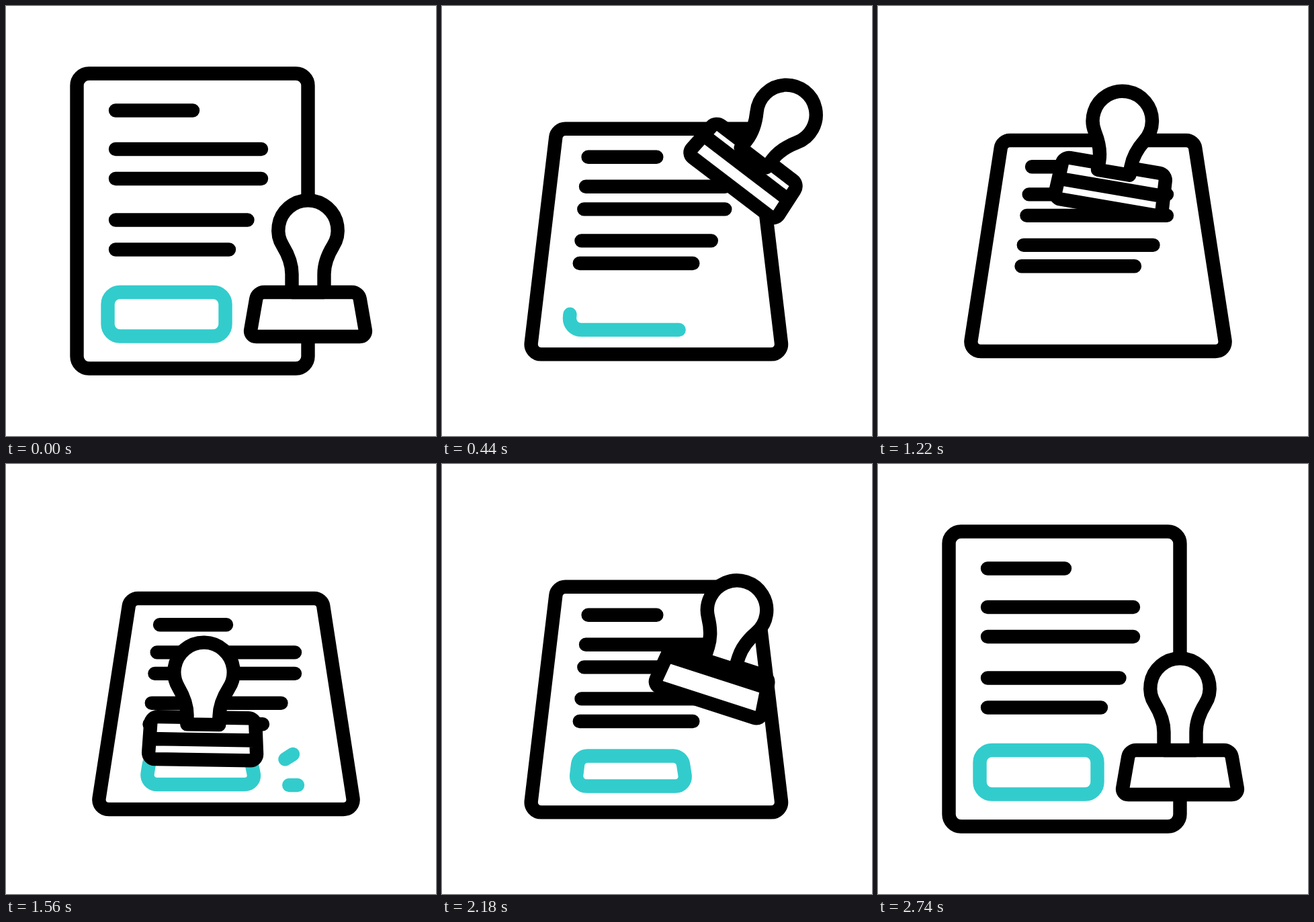
Recreate the animation shown at these times as an HTML page. Size 640x640 px, loop 3.6 s.

```html
<!DOCTYPE html>
<html lang="en">
<head>
<meta charset="utf-8">
<title>Stamping a document</title>
<style>
  html, body { margin: 0; width: 100%; height: 100%; overflow: hidden; background: #fff; }
  svg { display: block; width: 100%; height: 100%; }
  path { fill: none; stroke: #000; stroke-width: 20.4; stroke-linecap: round; stroke-linejoin: round; }
  .teal { stroke: #33cccc; }
  #stamp path { fill: #fff; }
</style>
</head>
<body>
<svg viewBox="0 0 640 640">
  <path id="paper"/>
  <path id="lines"/>
  <path id="mark" class="teal" pathLength="1"/>
  <path id="splash" class="teal"/>
  <g id="stamp">
    <path id="base"/>
    <path id="handle"/>
  </g>
</svg>
<script>
const LOOP = 3600, LAND = 1360, HOME = 2740;
const el = id => document.getElementById(id);
const draw = (id, d) => el(id).setAttribute('d', d);

const mix = (a, b, k) => a + (b - a) * k;
const mixAll = (a, b, k) => a.map((v, i) => mix(v, b[i], k));
const ease = (t, from, to) => {
  const s = Math.min(1, Math.max(0, (t - from) / (to - from)));
  return s * s * (3 - 2 * s);
};

// A sheet is a trapezoid: y, left, right of the top and of the bottom, then both radii
const rect = (left, top, right, bottom) => [top, left, right, bottom, left, right, 18, 18];
const paperFlat = rect(105.5, 100.5, 449.5, 539.5);
const paperTilt = [200, 184.5, 470.5, 514, 136, 519, 11.5, 17];
const markFlat = rect(151.5, 426, 326.5, 491.5);
const markTilt = [436.2, 214.5, 363.5, 477, 208, 372, 11.5, 17];
const markWide = [436.2, 214.5, 388, 477, 208, 395, 11.5, 19];

// Text lines: y and right end
const lines = [[155.5, 278], [213, 380], [257, 380], [318.5, 359.5], [362.5, 332]];

// Outline with rounded corners, starting on the bottom edge at the right
function sheet([y0, l0, r0, y1, l1, r1, rTop, rBottom]) {
  const p = [[r1, y1], [r0, y0], [l0, y0], [l1, y1]];
  const toward = (a, b, r) => mixAll(a, b, r / Math.hypot(b[0] - a[0], b[1] - a[1]));
  const d = p.map((v, i) => {
    const r = v[1] === y0 ? rTop : rBottom;
    const a = toward(v, p[(i + 3) % 4], r), b = toward(v, p[(i + 1) % 4], r);
    return `L${a}C${mixAll(a, v, .55)} ${mixAll(b, v, .55)} ${b}`;
  });
  return 'M' + d.join('').slice(1) + 'Z';
}

function drawPaper(tilt) {
  draw('paper', sheet(mixAll(paperFlat, paperTilt, tilt)));
  draw('lines', lines.map(([y, end]) => {
    const lean = 66 - .075 * (y - 155.5);
    return `M${163 + lean * tilt},${mix(y, 128.1 + .715 * y, tilt)}H${end + 50 * tilt}`;
  }).join(''));
}

function drawMark(t, tilt) {
  const fading = t < LAND, gone = fading ? ease(t, 0, 795) : 0;
  el('mark').style.display = gone < 1 ? '' : 'none';
  draw('mark', sheet(fading ? mixAll(markFlat, markWide, ease(t, 0, 730)) : mixAll(markFlat, markTilt, tilt)));
  el('mark').setAttribute('stroke-dasharray', gone ? '1 2' : 'none');
  el('mark').setAttribute('stroke-dashoffset', -gone);
}

function drawSplash(t) {
  const head = ease(t, 1380, 1500), tail = ease(t, 1450, 1640);
  const dash = (a, b) => `M${mixAll(a, b, tail)}L${mixAll(a, b, head)}`;
  draw('splash', head > 0 && tail < 1 ? dash([396, 451.5], [427, 432]) + dash([400, 478], [434, 478]) : '');
}

function drawStamp(t) {
  // depth opens the base from a flat front view into a box seen from above
  const depth = ease(t, 0, 600) - ease(t, 1980, 2380);
  const middle = mix(93, 101, depth), ridge = mix(65.5, 77, depth), neck = mix(93, 78.5, depth);
  const back = mix(75.5, 77.5, depth), front = mix(87, 81, depth);
  draw('base', sheet([mix(93, 68, depth), -back, back, mix(159, 131, depth), -front, front, 10, 10])
    + `M${-ridge},${middle}H${ridge}`);
  draw('handle', `M-24,${neck}V66C-24,51 -29.5,37 -37.5,24A44.2 44.2 0 1 1 37.5,24C29.5,37 24,51 24,66V${neck}Z`);

  // lift, swing over the page, press, rise, return
  const x = 449.5 - 27 * ease(t, 0, 900) - 133.5 * ease(t, 1040, LAND) + 160.5 * ease(t, 1460, 2600);
  const y = 459 - 239 * ease(t, 0, 600) + 243 * ease(t, 1140, LAND)
    - 146 * ease(t, LAND, 2080) + 142 * ease(t, 2080, 2510);
  const angle = 41 * (ease(t, 0, 540) - ease(t, 920, LAND)) + 22 * (ease(t, 1500, 2000) - ease(t, 2000, 2660));
  el('stamp').setAttribute('transform', `translate(${x} ${y}) rotate(${angle}) translate(0 -126)`);
}

function render(t) {
  const tilt = ease(t, 0, 600) - ease(t, 1980, HOME);
  drawPaper(tilt);
  drawMark(t, tilt);
  drawSplash(t);
  drawStamp(t);
}

const start = performance.now();
function tick() {
  render((performance.now() - start) % LOOP);
  requestAnimationFrame(tick);
}
tick();
</script>
</body>
</html>
```
